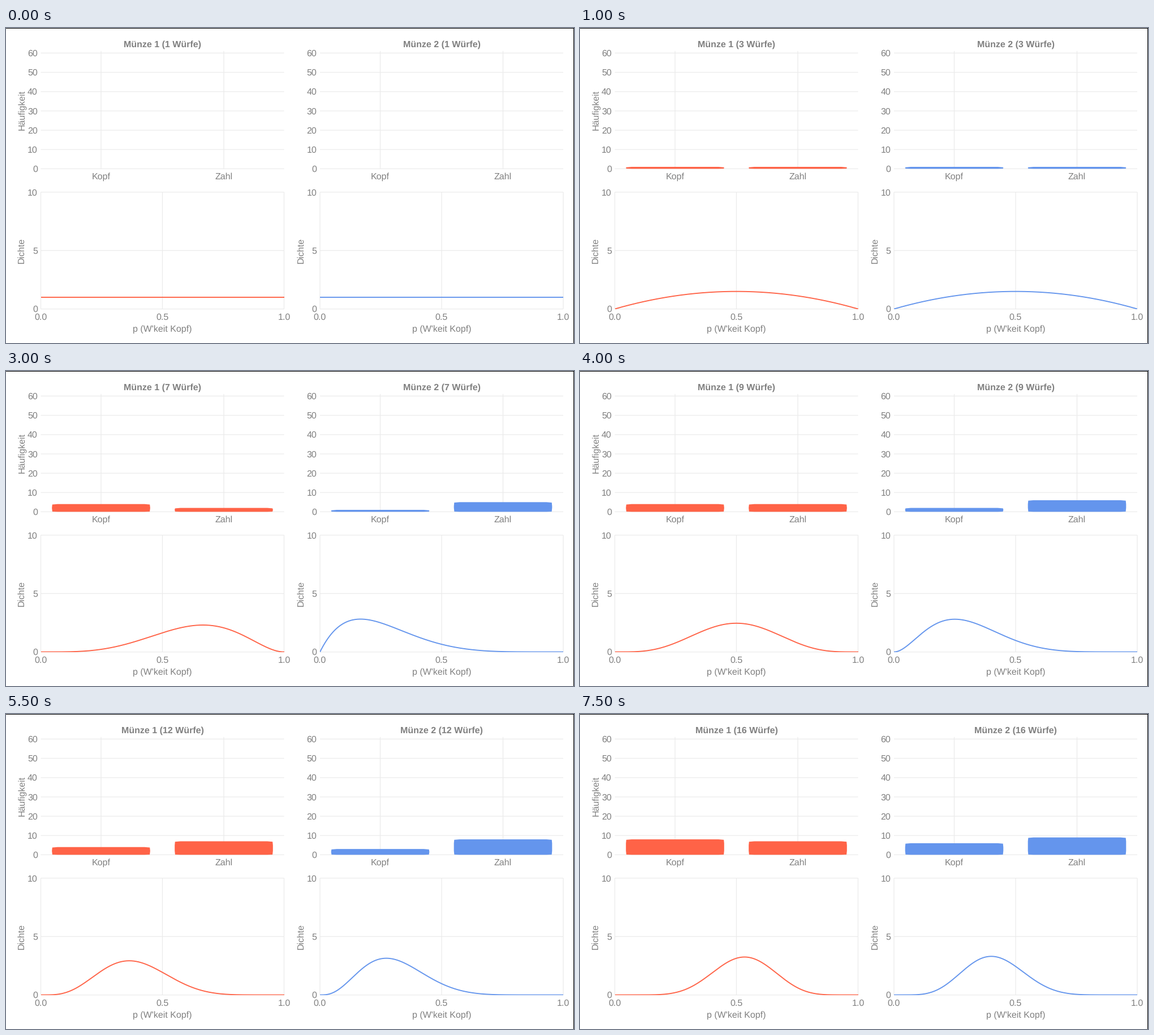
Recreate the animation shown at these times as a matplotlib script. Size 1004 by 558 pixels, loop 8000 ms.

```python
import math

import matplotlib.pyplot as plt
import numpy as np
from matplotlib.animation import FuncAnimation
from matplotlib.patches import Polygon, Rectangle

W, H, DPI = 1004, 558, 64          # 64 divides exactly, so no size is lost
PX = 72 / DPI                      # points per pixel
GRAY, GRID = "#808080", "#ebebeb"

# One letter per throw: K = Kopf, Z = Zahl
COINS = [
    ("Münze 1", 61.5, "#ff6347", "KZKKZKZZZZZKKKK"),
    ("Münze 2", 555.0, "#6495ed", "ZKZZZZZKZKZKZKK"),
]
SPAN = 430                         # panel width
BAR_TOP, BAR_ZERO, BAR_UNIT = 40.8, 249.4, 3.417
DENS_TOP, DENS_ZERO, DENS_UNIT = 290.8, 497.7, 20.69
BAR_HALF = 86.8
BAR_X = (106.5, 323.5)             # bar centres within a panel

plt.rcParams["font.family"] = "Liberation Sans"
plt.rcParams["text.hinting"] = "none"
plt.rcParams["text.hinting_factor"] = 1

fig = plt.figure(figsize=(W / DPI, H / DPI), dpi=DPI, facecolor="white")
ax = fig.add_axes([0, 0, 1, 1])
ax.set_xlim(0, W)
ax.set_ylim(H, 0)
ax.axis("off")

p = np.linspace(0, 1, 301)


def label(x, y, text, ha="center", **kw):
    return ax.text(x, y, text, ha=ha, va="baseline", color=GRAY,
                   fontsize=16 * PX, **kw)


def side_label(x, y, text):
    label(x, y, text, rotation=90, rotation_mode="anchor")


def grid(x0, y0, x1, y1):
    ax.plot([x0, x1], [y0, y1], color=GRID, lw=1.2 * PX, snap=False,
            solid_capstyle="butt", zorder=1)


def bar_shape(cx, count):
    """Bar outline with slightly softened corners."""
    h = count * BAR_UNIT
    left, right = cx - BAR_HALF, cx + BAR_HALF
    top, bottom = BAR_ZERO - h, BAR_ZERO
    dy = min(0.8, 0.25 * h)
    side = min(7, 0.45 * h)
    return [
        (left + 0.7, bottom - dy / 2), (left, bottom - side),
        (left, top + side), (left + 0.6, top + dy),
        (left + 10, top), (right - 10, top),
        (right - 0.6, top + dy), (right, top + side),
        (right, bottom - side), (right - 0.7, bottom - dy / 2),
        (right - 10, bottom), (left + 10, bottom),
    ]


def density(k, z):
    """Beta(k + 1, z + 1) on the grid p."""
    scale = (k + z + 1) * math.comb(k + z, k)
    return scale * p**k * (1 - p)**z


def make_panel(name, x0, color, throws):
    x1 = x0 + SPAN
    for v in range(0, 61, 10):
        y = BAR_ZERO - v * BAR_UNIT
        grid(x0, y, x1, y)
        label(x0 - 5.6, y + 5.6, str(v), ha="right")
    for cx, text in zip(BAR_X, ("Kopf", "Zahl")):
        grid(x0 + cx, BAR_TOP, x0 + cx, BAR_ZERO)
        label(x0 + cx, 267.6, text)
    for v in (0, 5, 10):
        y = DENS_ZERO - v * DENS_UNIT
        grid(x0, y, x1, y)
        label(x0 - 5.6, y + 5.6, str(v), ha="right")
    for v in (0, 0.5, 1):
        x = x0 + v * SPAN
        grid(x, DENS_TOP, x, DENS_ZERO)
        label(x, 516.4, f"{v:.1f}")
    label(x0 + SPAN / 2, 538, "p (W'keit Kopf)")
    side_label(x0 - 29.5, 394.3, "Dichte")

    title = label(x0 + SPAN / 2, 33.3, "", weight="bold")
    bars = [Polygon(bar_shape(x0 + cx, 0), fc=color, ec="none", zorder=3)
            for cx in BAR_X]
    for bar in bars:
        ax.add_patch(bar)
    curve, = ax.plot([], [], color=color, lw=1.9 * PX, zorder=3, snap=False)
    curve.set_clip_path(Rectangle((x0, DENS_TOP), SPAN,
                                  DENS_ZERO - DENS_TOP + 0.3,
                                  transform=ax.transData))

    def update(n):
        done = throws[:n]
        counts = done.count("K"), done.count("Z")
        title.set_text(f"{name} ({n + 1} Würfe)")
        for bar, cx, count in zip(bars, BAR_X, counts):
            bar.set_visible(count > 0)
            bar.set_xy(bar_shape(x0 + cx, count))
        curve.set_data(x0 + p * SPAN, DENS_ZERO - density(*counts) * DENS_UNIT)
        return [title, curve, *bars]

    return update


panels = [make_panel(*coin) for coin in COINS]
side_label(32, 145.2, "Häufigkeit")

# Thin black rim along the top and right
ax.add_patch(Rectangle((0, 0), W, 1, fc="black", ec="none", zorder=5))
ax.add_patch(Rectangle((W - 1, 0), 1, H, fc="black", ec="none", zorder=5))


def draw(n):
    return [artist for update in panels for artist in update(n)]


anim = FuncAnimation(fig, draw, frames=16, init_func=lambda: draw(0),
                     interval=500, repeat=True, repeat_delay=0, blit=False)
plt.show()
```
